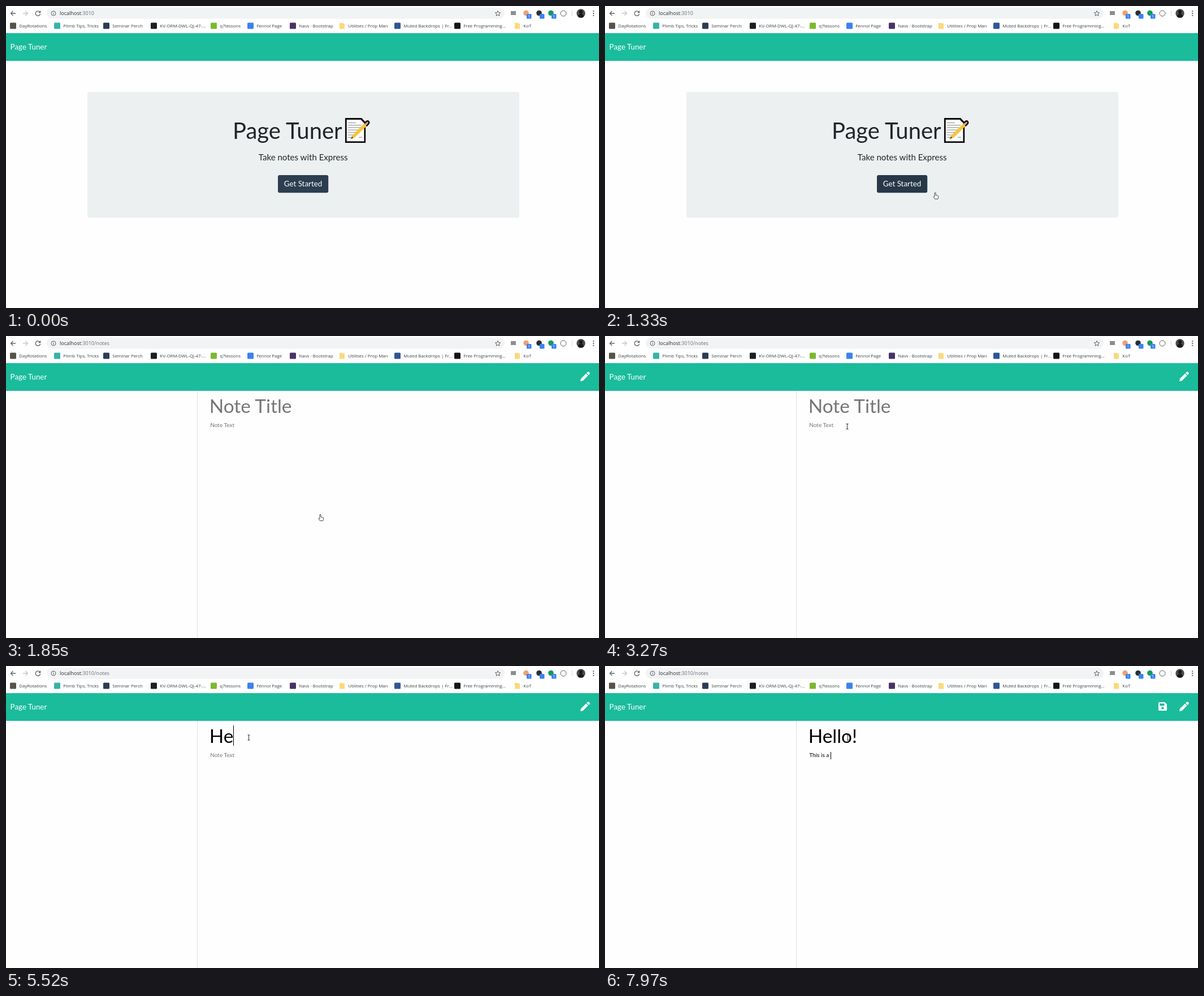
Write an HTML page that moves like this. It is 1049 by 534 pixels and loops after 8000 ms.

```html
<!DOCTYPE html>
<html lang="en">
<head>
<meta charset="utf-8">
<title>Page Tuner</title>
<style>
  html, body { margin: 0; width: 100%; height: 100%; overflow: hidden; background: #fefefe; }
  svg { display: block; width: 1049px; height: 534px; }
  text { white-space: pre; font-family: Lato, sans-serif; }
  .ui text { font-family: "Open Sans", "Noto Sans", sans-serif; }
  .line { fill: none; stroke: #5f6368; stroke-width: 1.3; }
  .thin { stroke-width: 1; }
</style>
</head>
<body>
<svg viewBox="0 0 1049 534">
  <rect width="1049" height="534" fill="#fefefe"/>

  <g class="ui">
    <rect width="1049" height="48" fill="#fff"/>
    <rect x="72" y="3" width="810" height="19.5" rx="9.7" fill="#f1f3f4"/>
    <path class="line" d="M17 13H8.5M12.5 9L8.5 13L12.5 17"/>
    <path class="line" d="M30 13H38.5M34.5 9L38.5 13L34.5 17" style="stroke:#c4c7ca"/>
    <g id="reload">
      <path class="line" d="M59.6 10.3A4.2 4.2 0 1 0 60.6 14"/>
      <path d="M61.3 8V12.3H57Z" fill="#5f6368"/>
    </g>
    <path id="stop" class="line" d="M52.5 9.2L60.3 17M60.3 9.2L52.5 17"/>
    <circle class="line thin" cx="84" cy="13" r="4"/>
    <path class="line thin" d="M84 12.3V15.2M84 10.5V11.5"/>
    <text x="95" y="16.2" font-size="9.05" fill="#2b2d30">localhost<tspan id="path" fill="#6c7075">:3010</tspan></text>
    <path class="line thin" d="M870 8.5L871.3 11.6L874.7 11.9L872.1 14.1L872.9 17.4L870 15.6L867.1 17.4L867.9 14.1L865.3 11.9L868.7 11.6Z"/>
    <rect x="893" y="9" width="9" height="7" fill="#8b8e91"/>
    <g id="extensions"></g>
    <circle class="line thin" cx="986" cy="13" r="5"/>
    <path d="M1001.5 8V18" stroke="#d5d8db"/>
    <circle cx="1017" cy="13" r="7.7" fill="#4a4a4a"/>
    <path d="M1012 19a5 5.5 0 0 1 10 0a7.7 7.7 0 0 1-10 0M1014 10.5a3 3.3 0 0 1 6 0a3 3.3 0 0 1-6 0" fill="#181818"/>
    <path d="M1039.3 8.2v2M1039.3 12v2M1039.3 15.8v2" stroke="#5f6368" stroke-width="2"/>
    <g id="bookmarks" font-size="7.9" fill="#3c4043"></g>
  </g>

  <rect y="48" width="1049" height="49" fill="#1abc9c"/>
  <text x="7.6" y="77" font-size="13.36" fill="#fff">Page Tuner</text>

  <g id="home">
    <rect x="144" y="152" width="764" height="222.5" rx="4" fill="#ecf0f1"/>
    <text x="401" y="234.5" font-size="40" fill="#212529">Page Tuner</text>
    <g>
      <path d="M601.3 199.5H628.5L634.8 206V240.7H601.3Z" fill="#fff" stroke="#0b0b0b" stroke-width="2.8"/>
      <path d="M605 206.5H619M605 210.7H629M605 215H628M605 219.3H624M605 223.6H620M605 227.9H616M605 232.2H612M624 232.2H630" stroke="#a9a9a9" stroke-width="1.5"/>
      <path d="M609.5 235.5L613 228.5L634.5 207L638.8 211.3L617 232.5Z" fill="#f7c537"/>
      <path d="M609.5 235.5L612 230.5L614.8 233Z" fill="#6b5637"/>
      <path d="M629.5 201.5L635 206.5L638 203.8Q640.5 202.6 641.8 204.6Q643 206.8 640.8 209L637.5 212.3" fill="#dc9a78" stroke="#0b0b0b" stroke-width="2.4"/>
    </g>
    <text x="525.6" y="273" font-size="15.05" text-anchor="middle" fill="#212529">Take notes with Express</text>
    <rect id="button" x="481" y="299" width="89.2" height="31.2" rx="3"/>
    <text x="525.5" y="319.3" font-size="13.36" text-anchor="middle" fill="#fff">Get Started</text>
  </g>

  <g id="notes">
    <path d="M338.5 97V534" stroke="#dee2e6"/>
    <g fill="#fff">
      <path id="save" fill-rule="evenodd" d="M980.7 64H990.4L994 67.6V77.5Q994 79 992.5 79H980.7Q979 79 979 77.5V65.6Q979 64 980.7 64ZM981.2 66.2V70.3H989.6V66.2ZM986.5 72.2a2.2 2.2 0 1 0 .01 0Z"/>
      <path d="M1016 80L1016.9 75.6L1026.1 66.4L1029.7 70L1020.5 79.2ZM1027 65.5L1028.7 63.8Q1030 62.7 1031.3 63.8L1032.3 64.8Q1033.5 66.1 1032.3 67.4L1030.6 69.1Z"/>
    </g>
    <text id="title" x="359.7" y="135.6" font-size="33.4"></text>
    <text id="body" x="361.2" y="161.4" font-size="10.05"></text>
    <rect id="caret" width="1"/>
  </g>

  <g id="cursor" stroke-linejoin="round">
    <path id="arrow" d="M.5 .5V9.2L2.4 7.5L3.8 10.6L5.2 10L3.8 7H6.4Z" fill="#fff" stroke="#333" stroke-width=".9"/>
    <path id="hand" d="M-1 1Q0-.6 1 1V5L5 6Q6 6.4 5.7 8L4.8 11.7H-.6L-3 7.8Q-2.7 6.4-1 7.7Z" fill="#fff" stroke="#333" stroke-width=".9"/>
    <path id="beam" d="M-2-4.5H2M0-4.5V4.5M-2 4.5H2" fill="none" stroke="#333"/>
  </g>
</svg>
<script>
const $ = id => document.getElementById(id);
const LOOP = 8000, HOVER = 1290, CLICK = 1640, LOADING = 1730, LOADED = 1850;

const bookmarks = [
  [7, 'DayRotations', '#57534a'], [85, 'Plimb Tips, Tricks', '#36b4a6'],
  [172, 'Seminar Perch', '#2d3b55'], [256, 'KV-ORM-DWL-QJ-47-...', '#1b1f23'],
  [362, 'q7lessons', '#7cb82f'], [427, 'Fennol Page', '#3b82f0'],
  [502, 'Navs · Bootstrap', '#493166'], [589, 'Utilities / Prop Man', 'folder'],
  [687, 'Muted Backdrops | Fr...', '#2f5597'], [793, 'Free Programming...', '#151515'],
  [899, 'KoT', 'folder']
];
const folder = x => `<path d="M${x + 1} 30h5.5l1 1h2.5v9.5h-9z" fill="#fbd978"/>`;
const square = (x, color) => `<rect x="${x}" y="29.5" width="11" height="11" rx="1.5" fill="${color}"/>`;
$('bookmarks').innerHTML = bookmarks.map(([x, label, color]) =>
  (color === 'folder' ? folder(x) : square(x, color)) +
  `<text x="${x + 16.3}" y="38">${label}</text>`).join('');

$('extensions').innerHTML = [[920, '#f0a070', '1'], [943, '#2b2f33', ''], [964, '#0f9d58', '1']]
  .map(([x, color, count]) => `<circle cx="${x}" cy="12.5" r="4.8" fill="${color}"/>
    <rect x="${x + 1}" y="14" width="8.5" height="8.5" rx="1.5" fill="#3b82f0"/>
    <text x="${x + 5.2}" y="20.8" font-size="6.5" text-anchor="middle" fill="#fff">${count}</text>`).join('');

// Pointer moves: start, end, then the place reached.
const moves = [
  [140, 310, 868, 463], [540, 720, 697, 388], [960, 1480, 556, 315],
  [2190, 2400, 428, 206], [2640, 3270, 428.5, 160], [3270, 3460, 430.5, 146],
  [3480, 3560, 432.5, 142], [3730, 3780, 437, 138], [3800, 3840, 434, 142],
  [4640, 4970, 429.5, 126.5]
];
const typed = (word, times) => [[0, ''], ...times.map((t, i) => [t, word.slice(0, i + 1)])];
const titles = typed('Hello!', [5320, 5520, 5620, 5770, 5870, 6400]);
const bodies = typed('This is a ', [7060, 7140, 7220, 7310, 7390, 7470, 7560, 7790, 7880, 7970]);
const carets = [[0, ''], [3760, 'body'], [4290, ''], [4790, 'body'], [4880, 'title'], [6700, 'body']];

const latest = (list, t) => list.filter(item => item[0] <= t).pop()[1];
const clamp = v => Math.min(1, Math.max(0, v));
const ease = v => v * v * (3 - 2 * v);
const show = (id, on) => $(id).setAttribute('display', on ? 'inline' : 'none');
const mix = (a, b, k) => `rgb(${a.map((v, i) => Math.round(v + (b[i] - v) * k))})`;

function pointer(t) {
  let x = 962, y = 532;
  for (const [start, end, toX, toY] of moves) {
    const k = ease(clamp((t - start) / (end - start)));
    x += (toX - x) * k;
    y += (toY - y) * k;
  }
  return [x, y];
}

// Fills a field and returns the width of its value.
function field(id, value, hint) {
  $(id).textContent = value || hint;
  $(id).setAttribute('fill', value ? '#000' : '#757575');
  return value ? $(id).getComputedTextLength() : 0;
}

function draw(t) {
  const loaded = t >= LOADED, loading = t >= LOADING && !loaded;
  show('home', !loaded);
  show('notes', loaded);
  show('reload', !loading);
  show('stop', loading);
  $('path').textContent = t >= LOADING ? ':3010/notes' : ':3010';

  const hover = clamp((t - HOVER) / 150);
  $('button').setAttribute('fill', mix([44, 62, 80], [28, 40, 51], hover));
  $('button').setAttribute('stroke', t >= CLICK ? 'rgba(44,62,80,.35)' : 'none');

  const [x, y] = pointer(t);
  show('cursor', t >= 170);
  $('cursor').setAttribute('transform', `translate(${x} ${y})`);
  show('arrow', t < HOVER);
  show('hand', t >= HOVER && t < 2220);
  show('beam', t >= 2220);

  if (!loaded) return;
  const body = latest(bodies, t);
  const widths = {
    title: field('title', latest(titles, t), 'Note Title'),
    body: field('body', body, 'Note Text')
  };
  show('save', body);

  const focus = latest(carets, t);
  show('caret', focus);
  if (focus) {
    const big = focus === 'title';
    $('caret').setAttribute('x', Math.round((big ? 359.7 : 361.2) + widths[focus]));
    $('caret').setAttribute('y', big ? 105 : 152);
    $('caret').setAttribute('height', big ? 36 : 13);
  }
}

function frame() {
  draw(performance.now() % LOOP);
  requestAnimationFrame(frame);
}
frame();
</script>
</body>
</html>
```
